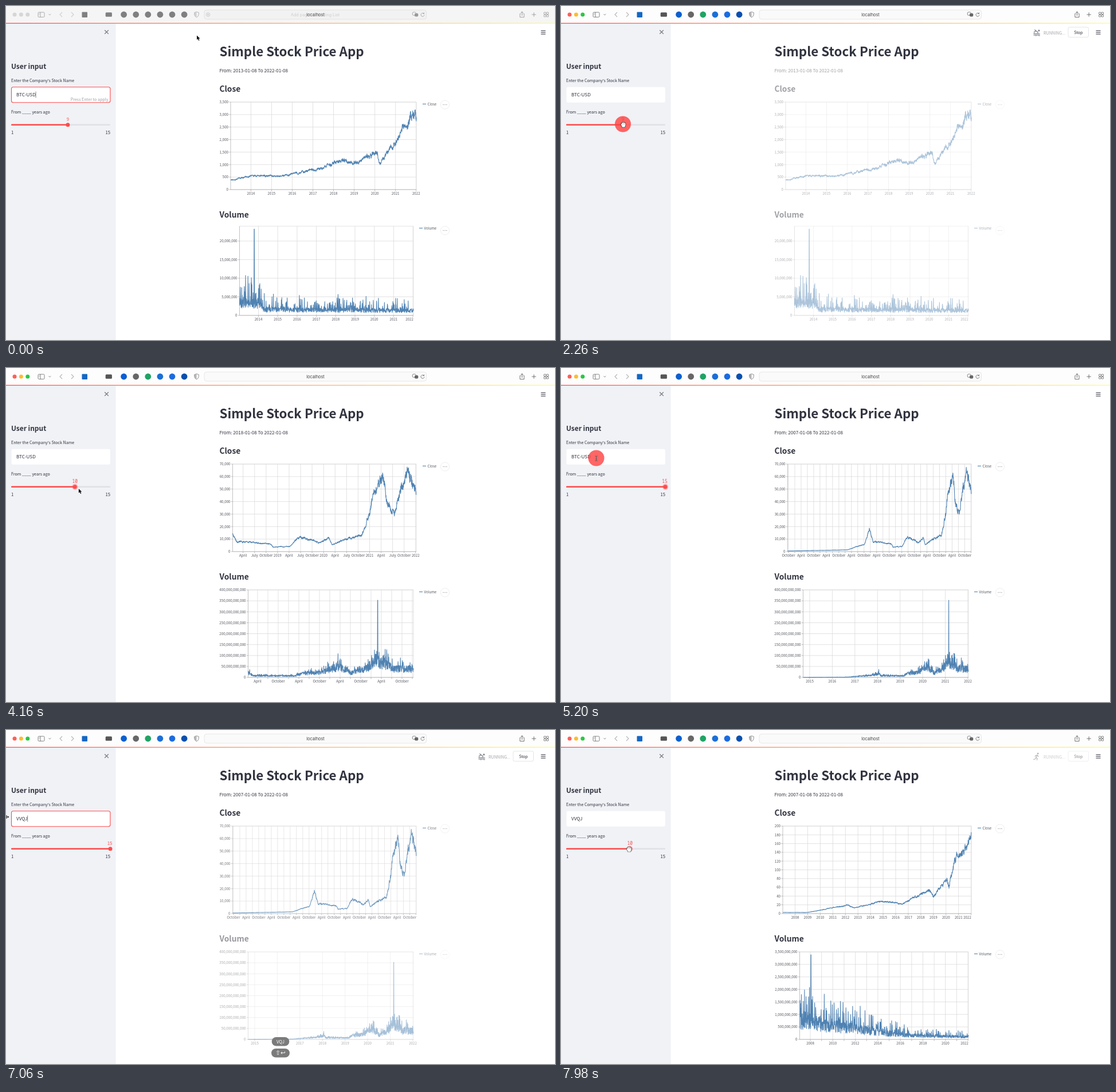
Animation, 958 px wide and 584 px high, one loop 8000 ms. Source, as an HTML page with a canvas:

```html
<!DOCTYPE html>
<html lang="en">
<head>
<meta charset="utf-8">
<title>Simple Stock Price App</title>
<style>
html, body { margin: 0; width: 100%; height: 100%; overflow: hidden; background: #fff; }
canvas { display: block; }
</style>
</head>
<body>
<canvas id="stage" width="958" height="584"></canvas>
<script>
const ctx = document.getElementById('stage').getContext('2d');
const LOOP = 8000;
const SANS = '"Noto Sans CJK SC","Noto Sans CJK JP","Noto Sans",sans-serif';
const MONO = '"Noto Sans Mono",monospace';
const INK = '#31333f', RED = '#ff4b4b', LINE = '#4f82b2';
const SYMBOL = 'VVQJ';

// ---------- helpers ----------
const clamp = v => Math.max(0, Math.min(1, v));
const between = (t, a, b) => t >= a && t < b;
const pulse = (t, a, b, ramp) => clamp(Math.min((t - a) / ramp, (b - t) / ramp));

// piecewise linear value through x, y pairs
function through(x, p) {
  if (x <= p[0]) return p[1];
  for (let i = 2; i < p.length; i += 2)
    if (x < p[i]) return p[i - 1] + (p[i + 1] - p[i - 1]) * (x - p[i - 2]) / (p[i] - p[i - 2]);
  return p[p.length - 1];
}
function hash(i, seed) {
  const s = Math.sin(i * 127.1 + seed * 311.7) * 43758.5453;
  return s - Math.floor(s);
}
function noise(x, seed) {
  const i = Math.floor(x), f = x - i;
  return hash(i, seed) * (1 - f) + hash(i + 1, seed) * f;
}
function text(s, x, y, size, o = {}) {
  // the CJK face draws its Latin letters about 12% larger
  const k = o.font ? 1 : 1.118;
  ctx.font = `${o.weight || 400} ${size / k}px ${o.font || SANS}`;
  ctx.textAlign = o.align || 'left';
  ctx.fillStyle = o.color || INK;
  ctx.fillText(s, x, y);
  return ctx.measureText(s).width;
}
function faded(alpha, draw) {
  if (alpha <= 0) return;
  ctx.save();
  ctx.globalAlpha *= alpha;
  draw();
  ctx.restore();
}
function disc(x, y, r, color) {
  ctx.beginPath(); ctx.arc(x, y, r, 0, 7);
  ctx.fillStyle = color; ctx.fill();
}
function ring(x, y, r, color) {
  ctx.beginPath(); ctx.arc(x, y, r, 0, 7);
  ctx.strokeStyle = color; ctx.lineWidth = .7; ctx.stroke();
}
function box(x, y, w, h, r, fill, edge, lw = .8) {
  ctx.beginPath(); ctx.roundRect(x, y, w, h, r);
  if (fill) { ctx.fillStyle = fill; ctx.fill(); }
  if (edge) { ctx.strokeStyle = edge; ctx.lineWidth = lw; ctx.stroke(); }
}
function stroke(d, color, lw = 1) {
  ctx.strokeStyle = color; ctx.lineWidth = lw;
  ctx.stroke(new Path2D(d));
}

// ---------- chart curves ----------
const STEP = .3;
function price(keys, seed, amp = .1) {
  return x => {
    const y = through(x, keys);
    const rough = noise(x / 5, seed) + noise(x / 1.5, seed + 1) + hash(Math.round(x / STEP), seed + 2) - 1.5;
    return Math.min(320.5, y - (321 - y) * amp * rough);
  };
}
// trading volume: a noisy floor, rare bursts and one tall peak
function volume(heights, seed, floor, burst, peakX, peakY) {
  return x => {
    if (Math.abs(x - peakX) < STEP) return peakY;
    const i = Math.round(x / STEP);
    const k = floor + .8 * hash(i, seed) + burst * hash(i, seed + 1) ** 9;
    return 541 - k * through(x, heights);
  };
}
// the last four years squeezed into the right part of the long chart
const joined = (early, late, from, to) => x => x < to ? early(x) : late(from + (x - to) / .5473);

function trace(f, x0, x1) {
  const path = new Path2D();
  for (let x = x0; x <= x1; x += STEP) path.lineTo(x, f(x));
  return path;
}

const techPrice = price([392,305, 430,296, 480,298, 543,285, 590,269, 608,275, 648,255, 651,274,
  669,252, 685,230, 705,196, 716,194], 3);
const coinPrice = price([395,287, 402,303, 462,308, 466,313, 495,312, 512,294, 546,305, 564,298,
  569,309, 598,297, 620,294, 632,264, 638,234, 646,212, 657,183, 664,235, 678,251, 688,217,
  703,178, 716,226], 8, .12);
const earlyPrice = price([395,320, 500,318, 530,308, 538,281, 541,290], 12);
const fruitPrice = price([387,319, 430,319, 500,306, 512,311, 560,299, 595,304, 643,279, 650,292,
  673,260, 677,274, 687,227, 708,205, 716,183], 17);

const techVolume = volume([407,25, 446,23, 449,11, 711,9], 21, .5, 2.4, 433.3, 390);
const coinVolume = volume([422,10, 430,3, 505,3, 520,8, 550,9, 582,21, 602,8, 630,18, 645,32, 662,27,
  674,17, 711,16], 31, .5, .9, 648.4, 406);
const earlyVolume = volume([422,0, 500,.5, 553,5], 35, .5, 1);
const fruitVolume = volume([416,44, 470,29, 540,18, 600,9, 711,5], 43, .4, 1.7, 436.2, 393);

// ---------- chart layouts ----------
const ticks = (n, x, dx, label) => Array.from({ length: n }, (_, i) => [x + dx * i, label(i)]);
const years = (from, x, dx) => ticks(2023 - from, x, dx, i => from + i);
const evens = (names, shown) => i => i % 2 || i > shown ? '' : names[i / 2 % 2];
const quarters = i => ['April', 'July', 'October', 2019 + (i >> 2)][i % 4];

function chart(name, x0, y0, n, step, marks, f, o = {}) {
  const isClose = name === 'Close', x1 = isClose ? 716 : 711, y1 = isClose ? 321 : 541;
  return { name, x0, x1, y0, y1, n, step, marks, flush: o.flush, dy: o.dy || (y1 - y0) / n,
    path: trace(f, x0, x1), lx: isClose ? 727 : 721, ly: y0 + 3.4, my: isClose ? 172.5 : 392.5 };
}
const closes = [
  chart('Close', 392, 168, 7, 500, years(2014, 427.4, 36.04), techPrice),
  chart('Close', 395.5, 168, 7, 1e4, ticks(16, 413.7, 20.07, quarters), coinPrice),
  chart('Close', 395.5, 168, 7, 1e4, ticks(30, 397, 10.98, evens(['October', 'April'], 28)),
    joined(earlyPrice, coinPrice, 395.5, 540.6)),
  chart('Close', 387, 168, 10, 20, years(2008, 408.5, 21.94), fruitPrice, { flush: true })
];
const volumes = [
  chart('Volume', 407.5, 385, 4, 5e6, years(2014, 440.5, 33.7), techVolume, { flush: true, dy: 32.5 }),
  chart('Volume', 422.5, 388, 8, 5e10, ticks(16, 439, 18, evens(['April', 'October'], 15)), coinVolume),
  chart('Volume', 422.5, 388, 8, 5e10, years(2015, 434, 39.43), joined(earlyVolume, coinVolume, 422.5, 553.1)),
  chart('Volume', 416.5, 388, 7, 5e8, ticks(15, 435, 19.65, i => i % 2 ? '' : 2008 + i), fruitVolume, { flush: true })
];

function drawChart(c) {
  const color = '#54565f', last = c.marks.length - 1;
  let grid = '', notches = '';
  for (const [x] of c.marks) {
    grid += `M${x} ${c.y0}V${c.y1}`;
    notches += `M${x} ${c.y1}v2.8`;
  }
  for (let i = 0; i <= c.n; i++) {
    const y = c.y1 - i * c.dy;
    grid += `M${c.x0} ${y}H${c.x1}`;
    notches += `M${c.x0} ${y}h-2.8`;
    text((i * c.step).toLocaleString('en-US'), c.x0 - 4, y + 2.3, 6.9, { align: 'right', color });
  }
  stroke(grid + `M${c.x0} ${c.y0}H${c.x1}V${c.y1}`, '#d6d6d6', .7);
  stroke(notches + `M${c.x0} ${c.y0}V${c.y1}H${c.x1}`, '#999', .6);
  c.marks.forEach(([x, label], i) =>
    text(label, c.flush && i === last ? c.x1 - 7 : x, c.y1 + 9.3, 6.9, { align: 'center', color }));
  ctx.lineJoin = 'round';
  ctx.strokeStyle = LINE; ctx.lineWidth = 1.1;
  ctx.stroke(c.path);
  stroke(`M${c.lx} ${c.ly}h6`, LINE, 1.1);
  text(c.name, c.lx + 8.5, c.ly + 2.4, 6.9, { color });
  ring(766, c.my, 7.6, '#e6e7ea');
  for (const i of [-1, 0, 1]) disc(766 + 2.9 * i, c.my, .7, '#999');
}

// ---------- browser bar ----------
function drawToolbar(t) {
  const on = t >= 1500, ink = on ? '#666' : '#999', dim = on ? '#b5b5b5' : '#cfcfcf';
  const tint = c => on ? c : '#808080', ui = 'Inter,sans-serif';
  ctx.fillStyle = on ? '#fdfdfd' : '#f5f5f5';
  ctx.fillRect(0, 0, 958, 30);
  ['#ff5f57', '#febc2e', '#28c840'].forEach((c, i) => disc(15 + 11.4 * i, 15, 3.5, on ? c : '#d6d6d6'));
  box(56, 11, 11, 8.4, 1.5, null, ink);
  stroke('M60 11V19.4M57.5 13h1M57.5 15h1M74.5 14l1.9 1.9 1.9-1.9', ink, .8);
  stroke('M98 11l-4 4 4 4M114 11l4 4-4 4', dim, 1.1);

  // extension buttons
  box(132.5, 10.5, 9.5, 9.5, 1, tint('#1467c4'));
  box(173.7, 11.3, 11.2, 7.5, 1.5, tint('#555'));
  ['#0a5fd0', '#666', '#1fa463', '#1a6fd6', '#1b6be0', '#0a4fae'].forEach((c, i) =>
    disc(205.6 + 21.1 * i, 15, 5.4, tint(c)));
  stroke('M332.5 10.2l3.8 1.3v3.2q0 3.4-3.8 5.2q-3.8-1.8-3.8-5.2v-3.2z', ink, .7);
  ctx.fillStyle = dim;
  ctx.fill(new Path2D('M332.5 10.2v9.7q-3.8-1.8-3.8-5.2v-3.2z'));

  // address field
  box(346, 7, 387.5, 16, 4, on ? '#fafafa' : '#f2f2f2', on ? '#e3e3e3' : '#dedede');
  faded(clamp((80 - t) / 40), () => {
    text('Add page to Reading List', 539.5, 17.7, 7.2, { align: 'center', font: ui, color: '#cdcdcd' });
    ring(352.5, 15, 3.3, '#bbb');
    stroke('M350.8 15h3.4M352.5 13.3v3.4', '#bbb', .7);
  });
  text('localhost', 540, 17.7, 7.4, { align: 'center', font: ui, color: on ? '#444' : '#555' });
  box(709.3, 10.7, 6, 5.6, 2, null, ink);
  box(713, 12.7, 6.3, 5.8, 2, ink);
  stroke('M729.2 13.2A3 3 0 1 0 730 15.6M729.5 11.5v2h-2', ink, .8);

  stroke('M898.5 13.4h-1.6v6.2h7.2v-6.2h-1.6M900.5 17v-7M898.4 12l2.1-2.2 2.1 2.2', ink, .9);
  stroke('M917.5 15h7.4M921.2 11.3v7.4', ink, .9);
  for (const x of [938.7, 943.2]) for (const y of [11, 15.5]) box(x, y, 3.4, 3.4, .5, null, ink);

  const g = ctx.createLinearGradient(0, 0, 958, 0);
  g.addColorStop(0, RED); g.addColorStop(1, '#fffd80');
  ctx.fillStyle = g;
  ctx.fillRect(0, 29.6, 958, 1.3);
}

// ---------- pointer ----------
// each move: start, end, target x, target y
const MOVES = [
  [420, 1080, 69, 156.5], [1480, 2200, 108, 207], [2260, 3000, 45.5, 208], [3960, 4320, 184, 213],
  [4500, 5160, 61.5, 158], [5260, 5480, 1, 152], [7280, 7640, 182, 208], [7740, 7980, 118, 208]
];
function pointer(t) {
  let x = 333, y = 51.5;
  for (const [a, b, tx, ty] of MOVES) {
    const u = clamp((t - a) / (b - a)), e = u * u * (3 - 2 * u);
    x += (tx - x) * e;
    y += (ty - y) * e;
  }
  return [x, y];
}
// the slider trails the pointer while it is dragged
function yearsAgo(t) {
  if (t < 2260) return 9;
  const at = t < 3960 ? Math.min(t, 3100) : t < 7740 ? Math.min(t, 4400) : t;
  return Math.round(1 + 14 * (pointer(at - 16)[0] - 9) / 173);
}
function shape(d, fill, line, lw) {
  const p = new Path2D(d);
  ctx.strokeStyle = line; ctx.lineWidth = lw; ctx.stroke(p);
  ctx.fillStyle = fill; ctx.fill(p);
}
function drawPointer(t) {
  const [x, y] = pointer(t);
  for (const press of [2200, 3880, 5130, 7670])
    faded(.8 * pulse(t, press, press + 200, 60), () => disc(x, y - .5, 14, '#ff4040'));
  ctx.save();
  ctx.translate(x, y);
  ctx.lineJoin = 'round';
  if (between(t, 2180, 4000) || t >= 7600) {
    shape('M-3.6-.6q1-1 1.7.6v-2.6q.9-1.2 1.7-.2q.9-1.2 1.8 0q1-.8 1.7.4q1.2-.4 1.3.9v2.6q-.4 2-1.4 3.6h-4.4z', '#fff', '#333', 1.3);
    stroke('M-.2-2v2M1.6-2v2M3.2-1.6v1.8', '#777', .5);
  } else if (between(t, 5060, 5420)) {
    stroke('M-2-4.2q2 0 2 1.2q0-1.2 2-1.2M0-3v6.2M-2 4.4q2 0 2-1.2q0 1.2 2 1.2M-1 1h2', '#555', .9);
  } else if (between(t, 5420, 7340)) {
    stroke('M0-3v6M0 0h3', '#111');
    shape('M2-1.8l2.4 1.8-2.4 1.8z', '#111', '#fff', .3);
  } else {
    shape('M0 0v7.6l1.8-1.6 1.3 3 1.4-.6-1.3-2.9h2.4z', '#111', '#fff', .9);
  }
  ctx.restore();
}

// ---------- sidebar ----------
const typedCount = t => Math.max(0, Math.min(4, 1 + Math.floor((t - 6040) / 130)));

function drawSidebar(t) {
  ctx.fillStyle = '#f0f2f6';
  ctx.fillRect(0, 30.9, 191.5, 553.1);
  stroke('M172.2 42.2l6.6 6.6M178.8 42.2l-6.6 6.6', '#7b7d87', 1.3);
  text('User input', 9, 109.5, 13.35, { weight: 600 });
  text("Enter the Company's Stock Name", 9, 133.3, 7.95);

  const focus = t < 2220 || between(t, 5220, 7740);
  box(9.5, 141.8, 172.4, 27, 3, '#fff', focus && RED, 1.1);
  const value = t < 5480 ? 'BTC-USD' : SYMBOL.slice(0, typedCount(t));
  if (between(t, 5300, 5480)) {
    ctx.fillStyle = '#b4d5fe';
    ctx.fillRect(18, 149, 34.5, 12);
  }
  const w = text(value, 18, 158.4, 9.1);
  const blink = t < 5000 ? t - 60 : t - 5700;
  const hidden = blink >= 0 && blink % 690 < 190 && !between(t, 6040, 6600);
  if (focus && !hidden) stroke(`M${18.3 + w} 149.5v11`, '#555', .7);
  if (t < 1500 || between(t, 5480, 6640))
    text('Press Enter to apply', 178.5, 165.7, 7.95, { align: 'right', color: '#a0a1a8' });

  text('From ____ years ago', 9, 188, 7.95);
  const n = yearsAgo(t), x = 9 + 173 * (n - 1) / 14;
  const held = between(t, 2230, 5220) || t >= 7740;
  box(9, 206.6, 173, 2.3, 1, '#dfe1e7');
  box(9, 206.6, x - 9, 2.3, 1, RED);
  if (held) disc(x, 207.8, 5.2, 'rgba(255,75,75,.35)');
  disc(x, 207.8, 3.5, RED);
  text(n, Math.min(x, 181), 201, held ? 8 : 8.6, { align: 'center', color: RED, font: held && MONO });
  text('1', 9, 223.6, 8.6);
  text('15', 182, 223.6, 8.6, { align: 'right' });
}

// ---------- main page ----------
const POSES = [
  { head: [832.2, 41.2], limbs: 'M829 48l2.2-4-3 .5-1 2.2M831 44.8l2.8 1.4M829 48l2 1.8-.6 3M828.6 48.4l-1.4 2.6-3 .4' },
  { head: [830, 40.4], limbs: 'M825 42.8h10M828.6 43v9.4M831.4 43v9.4M830 43v5' },
  { head: [834, 43], limbs: 'M825 46l4-2.6 4 3M829 43.4l-2.6-2M824.5 48.5q1.4-1.4 2.8 0t2.8 0 2.8 0 2.8 0M824.5 51.2q1.4-1.4 2.8 0t2.8 0 2.8 0 2.8 0' }
];
function drawStatus(t) {
  const runs = [[1520, 3800], [4420, 5100], [6680, 7560], [7870, 9000]];
  faded(Math.max(...runs.map(([a, b]) => pulse(t, a, b, 200))), () => {
    const { head, limbs } = POSES[Math.floor(t / 200) % 3];
    stroke(limbs, '#777983', 1.2);
    disc(...head, 1.4, '#777983');
    text('RUNNING...', 842, 50, 7.95, { color: '#a3a4ab' });
    box(885, 37, 35.5, 17.6, 2.5, '#fff', '#dcdde1');
    text('Stop', 902.8, 48.7, 7.95, { align: 'center' });
  });
  stroke('M933.5 43.2h8M933.5 46.2h8M933.5 49.2h8', '#555762', 1.2);
}

function drawPage(t) {
  const stale = through(t, [1700, 1, 2400, .33, 3440, .33, 3520, 1, 4560, 1, 4920, .6, 4980, 1]);
  const close = stale * through(t, [6780, 1, 7000, .7, 7200, 1]);
  const vol = stale * through(t, [6780, 1, 7060, .5, 7180, .4, 7260, 1]);
  const stage = (lag = 0) => [3460, 4940, 7110].filter(at => t >= at + lag).length;
  const heading = { weight: 600 };

  text('Simple Stock Price App', 372.5, 88, 25, { weight: 700 });
  faded(stale, () => {
    const from = [2013, 2018, 2007, 2007][stage()];
    text(`From: ${from}-01-08 To 2022-01-08`, 372.5, 115.8, 9.05);
    text('Close', 372.5, 150, 15.4, heading);
  });
  faded(close, () => drawChart(closes[stage(20)]));
  faded(vol, () => {
    text('Volume', 372.5, 370, 15.4, heading);
    drawChart(volumes[stage(60)]);
  });
}

// ---------- key display ----------
function pill(label, y, w, alpha, font) {
  faded(alpha, () => {
    box(479 - w / 2, y, w, 15.6, 7.8, '#7b7b7b');
    text(label, 479, y + 10.9, font ? 10.5 : 8.8, { align: 'center', color: '#fff', font });
  });
}
function drawKeys(t) {
  const symbols = '"DejaVu Sans",sans-serif', n = typedCount(t);
  pill('⇧↩', 557, 32, pulse(t, 1250, 2200, 60), symbols);
  pill('⌫', 557, 26, pulse(t, 5460, 6050, 40), symbols);
  if (n) pill(SYMBOL.slice(0, n).slice(-3), t < 6620 ? 557 : 537, 18 + 4.2 * Math.min(n, 3), pulse(t, 6000, 7400, 60));
  pill('⇧↩', 557, 32, pulse(t, 6620, 7640, 60), symbols);
}

function frame(t) {
  ctx.fillStyle = '#fff';
  ctx.fillRect(0, 0, 958, 584);
  for (const draw of [drawPage, drawSidebar, drawToolbar, drawStatus, drawKeys, drawPointer]) draw(t);
}
const start = performance.now();
function tick() {
  frame((performance.now() - start) % LOOP);
  requestAnimationFrame(tick);
}
tick();
</script>
</body>
</html>
```
